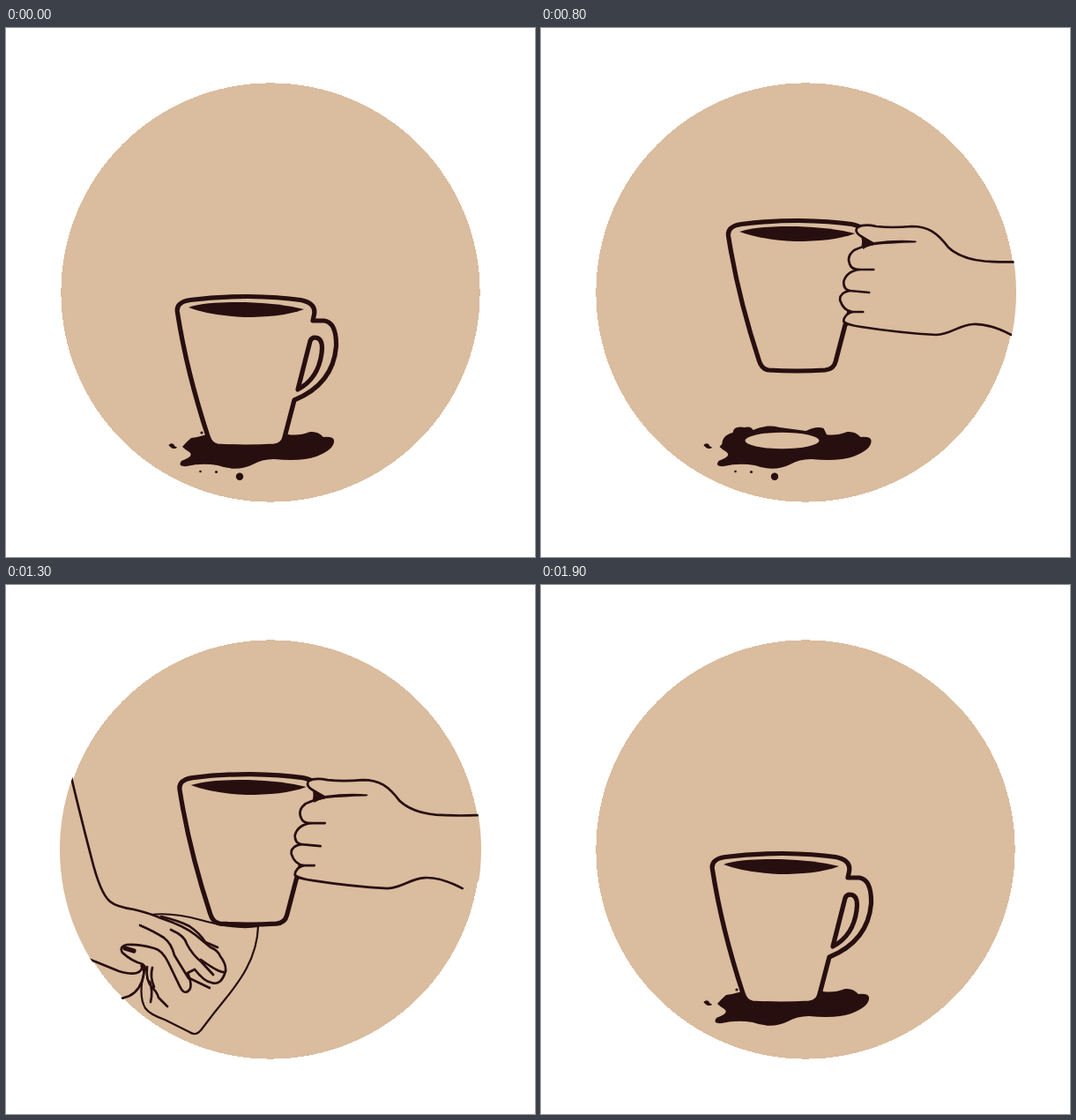
Recreate the animation shown at these times as an HTML page. Size 600 by 600 pixels, loop 2 s.

```html
<!DOCTYPE html>
<html lang="en">
<head>
<meta charset="utf-8">
<title>Coffee cup</title>
<style>
  html, body { margin: 0; width: 100%; height: 100%; overflow: hidden; background: #fff; }
  svg { display: block; width: 100vw; height: 100vh; }
  .ink { fill: #270f10; }
  .line { fill: none; stroke: #270f10; stroke-width: 2.7; stroke-linecap: round; stroke-linejoin: round; }
  .skin { fill: #dabc9e; }
  .bold { stroke-width: 5.2; }
  .thin { stroke-width: 2.2; }
</style>
</head>
<body>
<svg viewBox="0 0 600 600">
  <clipPath id="disc"><circle cx="300" cy="300" r="239"/></clipPath>
  <circle class="skin" cx="300" cy="300" r="237.6" shape-rendering="crispEdges"/>
  <g clip-path="url(#disc)">
    <g id="spill" class="ink">
      <g id="puddle">
        <path d="M228 461L320 461Q332 463 345 458Q354 457 360 464Q373 463 372 469Q372 478 352 486Q335 492 304 489Q290 489 280 495Q262 504 240 496Q222 493 205 497Q194 498 199 491Q214 486 208 481Q203 478 200 475Q204 470 210 465Q218 464 228 461Z"/>
        <g id="ring">
          <path d="M203 474Q202 462 215 459Q216 451 228 453Q236 451 238 456Q252 449 268 453L298 457Q310 451 318 454L322 462Z"/>
          <ellipse class="skin" cx="271" cy="468" rx="42" ry="9.300"/>
        </g>
      </g>
      <path d="M184.500 473.500C186 470 191 471 191 474L194 475.500Q193 478 188 476.500Z"/>
      <g id="drops">
        <circle cx="265" cy="508.700" r="4.200"/>
        <circle cx="238.500" cy="503.500" r="1.500"/>
        <circle cx="220.500" cy="503" r="1.300"/>
      </g>
      <circle id="speck" cx="222" cy="459" r="1.600"/>
    </g>

    <g id="wiper">
      <path class="skin line thin" d="M163 374Q190 371 221 380Q260 391 286 387C285 425 262 453 250 468Q236 485 221 505Q215 512 208 507L180 493Q163 487 158 480Q152 470 154 452L157 436"/>
      <path class="skin line" d="M20 -5L75 222Q86 268 97 310Q107 350 118 359Q125 365 145 368Q162 372 176 378Q203 387 215 397L232 411Q240 414 243 421Q250 430 249 438Q244 455 233 451Q225 450 214 436L206 440Q213 457 206 461Q201 464 197 455L184 428Q177 414 168 412Q150 407 137 408Q128 410 132 417Q143 427 155 430Q155 446 128 438L101 427L-60 366"/>
      <path class="line" d="M152 386Q168 393 179 400Q188 407 191 420L207 446M187 391Q203 398 205 407Q211 419 222 428L235 442M176 376Q197 381 208 387Q220 395 226 405L240 411M249 438Q246 443 221 425M208 446L231 457"/>
      <path class="line" d="M100 478Q120 474 134 468Q148 465 154 450Q157 442 157 432M160 433Q158 448 166 457Q171 461 173 468L183 478M166 434Q163 444 168 456M163 450Q167 461 164 473"/>
      <path class="line bold" d="M135 412L145 415M155 432L157 436"/>
    </g>

    <g id="cup">
      <path class="skin line bold" d="M194.500 323Q192 311 209 308.500Q240 304.500 274 304.500Q310 305 334 308.500Q352 312 349.500 325L348 332L361 332Q375 334 374.500 361Q371 404 327 422L316 464Q314 473 304 474Q272 476 240 474Q232 473 229 463Q205 390 194.500 323Z"/>
      <path class="line bold" d="M331 410L345 355Q347 350 353 351.500Q360 354 358 369Q354 398 331 410Z"/>
      <path class="ink" d="M207 317C225 311 250 311 272 311Q310 312 338 319C320 326 295 328 270 328Q230 326 207 317Z"/>
    </g>

    <g id="grip">
      <path class="skin line" d="M700 349L531 351Q508 352 485 350.500Q458 348 444 335C431 318 421 311 402 311Q380 313 362 311Q348 308 341 312Q336 317 346 323L358 331Q345 334 337 338Q328 345 332 354Q334 360 343 360Q328 362 325 374Q325 383 332 384Q320 386 321 395Q325 407 335 408Q325 411 325 419Q330 423 345 425Q390 432 430 434C448 433 455 423 472 422Q490 421 515 434"/>
      <path class="ink" d="M345 321L359 329Q385 325.500 407 327.500Q409 329 405 329.500Q380 330 361 332Q352 333 347 337Z"/>
      <path class="line" d="M343 360L359 360M332 384L354 386M335 408L347 408"/>
    </g>
  </g>
</svg>
<script>
  const STEP = 100, COUNT = 20;
  const GRAB = 4, TOP = 10, WIPED = 13, RELEASE = 17;
  const el = id => document.getElementById(id);
  const show = (id, on) => { el(id).style.display = on ? "" : "none"; };
  const move = (id, x, y) => el(id).setAttribute("transform", `translate(${x} ${y})`);
  const clamp = v => Math.min(1, Math.max(0, v));

  // A steady lift that drifts right, then a fall that swings slightly past the resting place.
  function cupOffset(s) {
    if (s <= TOP) {
      const u = clamp((s - GRAB) / (TOP - GRAB));
      return [41 * u * u, -129 * u];
    }
    const swing = clamp((s - TOP) / 6), fall = clamp((s - TOP) / 5.45);
    return [41 * (1 - swing) * (1 - swing / 0.575), -129 * (1 - fall * fall)];
  }

  // In from the left, one sweep across the puddle, and out again.
  function wiperOffset(s) {
    const away = Math.max(0, TOP - s, (s - WIPED) / 2);
    const sweep = Math.sin(Math.PI * clamp((s - TOP) / (WIPED - TOP)));
    return [122 * sweep - 134 * away, 25 * sweep - 21 * away];
  }

  function draw(s) {
    const [x, y] = cupOffset(s);
    const reach = Math.max(0, 60 * (GRAB - s), 80 * (s - RELEASE));
    const lifted = s > GRAB && s < COUNT - 1;

    move("cup", x, y);
    move("grip", x + reach, y);
    move("wiper", ...wiperOffset(s));
    move("puddle", lifted ? 2.5 : 0, 0);

    show("grip", s > 0 && s < COUNT - 1);
    show("wiper", s > 8 && s < 16);
    show("spill", s < 12 || s === COUNT - 1);
    show("ring", lifted);
    show("speck", !lifted);
    show("drops", s < COUNT - 1);
  }

  const start = performance.now();
  function tick() {
    draw(Math.floor((performance.now() - start) / STEP) % COUNT);
    requestAnimationFrame(tick);
  }
  tick();
</script>
</body>
</html>
```
